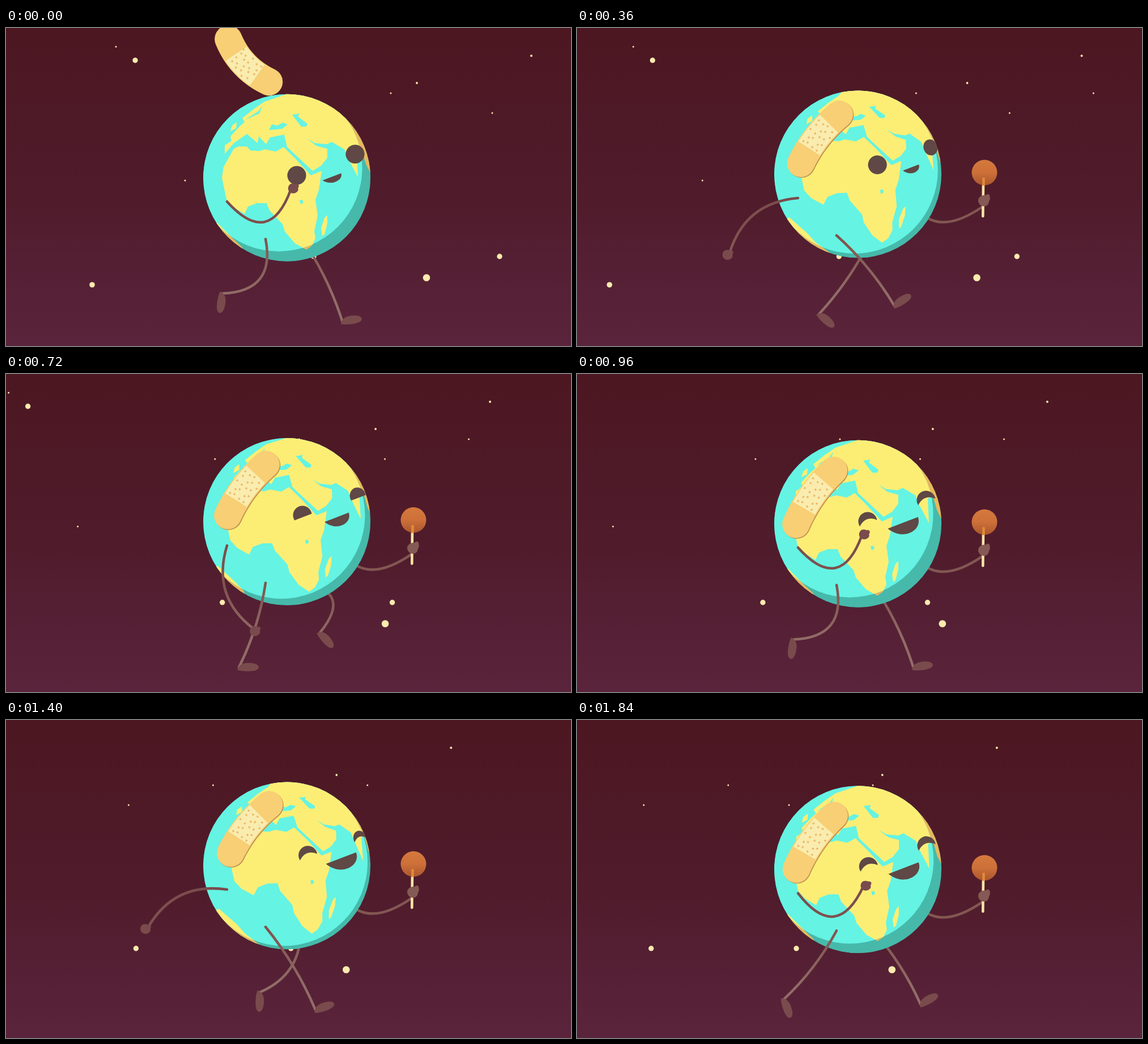
These frames come from a looping animation (997x561 px, 1880 ms). An HTML page:

```html
<!DOCTYPE html>
<html lang="en">
<head>
<meta charset="utf-8">
<title>Walking globe</title>
<style>
html, body { margin: 0; width: 100%; height: 100%; overflow: hidden; background: #4f1a28; }
svg { display: block; width: 100vw; height: 100vh; }
.limb { fill: none; stroke: url(#skin); stroke-width: 4.5; stroke-linecap: round; }
.skin { fill: url(#skin); }
.dark { fill: #5f4845; }
</style>
</head>
<body>
<svg viewBox="0 0 997 561" preserveAspectRatio="none">
  <defs>
    <linearGradient id="sky" x2="0" y2="1">
      <stop stop-color="#4c1721"/><stop offset=".55" stop-color="#501c2c"/><stop offset="1" stop-color="#5a243c"/>
    </linearGradient>
    <linearGradient id="skin" gradientUnits="userSpaceOnUse" x1="0" y1="290" x2="0" y2="470">
      <stop stop-color="#7a4b4c"/><stop offset=".45" stop-color="#80534f"/><stop offset="1" stop-color="#926d68"/>
    </linearGradient>
    <linearGradient id="candy" x2="0" y2="1">
      <stop stop-color="#d5793d"/><stop offset=".5" stop-color="#cd7039"/><stop offset="1" stop-color="#ab572d"/>
    </linearGradient>
    <radialGradient id="glow">
      <stop stop-color="#fff3b0"/><stop offset=".2" stop-color="#ffd98a"/><stop offset=".45" stop-color="#ef9450"/>
      <stop offset=".5" stop-color="#d98358" stop-opacity=".55"/><stop offset="1" stop-color="#b9645a" stop-opacity=".12"/>
    </radialGradient>
    <clipPath id="disc"><circle class="ball" r="147.5"/></clipPath>
    <clipPath id="lit"><circle id="light" r="147.5"/></clipPath>
  </defs>
  <rect width="997" height="561" fill="url(#sky)"/>
  <g id="stars" fill="#fbebaf"></g>
  <path id="farLeg" class="limb"/>
  <path id="farFoot" class="skin foot"/>
  <g id="treat">
    <path class="limb" style="stroke:#835752" d="M618 77Q655 99 716 57"/>
    <path d="M717 12L716.3 74" stroke="#fae6a6" stroke-width="4.6" stroke-linecap="round"/>
    <circle cx="719" cy="-3" r="22.5" fill="url(#candy)"/>
    <path d="M717.5 6V20" stroke="#e28a3c" stroke-width="4.5"/>
    <path fill="#855954" d="M708 48C707 39 717 36 721 37Q726 33 728 37Q730 43 727 48C726 59 711 60 708 48Z"/>
    <g id="spark">
      <circle r="48" fill="url(#glow)"/>
      <path id="rays" fill="#f3a36a" fill-opacity=".85"/>
      <path id="burst" fill="#fff0a8"/>
    </g>
  </g>
  <g clip-path="url(#disc)">
    <circle class="ball" r="148" fill="#46b9aa"/>
    <path class="land" fill="#e8b75b"/>
    <path class="sea" fill="#46b9aa"/>
    <g clip-path="url(#lit)">
      <circle class="ball" r="148" fill="#65f3e3"/>
      <path class="land" fill="#fcee75"/>
      <path class="sea" fill="#65f3e3"/>
    </g>
    <path id="eyeA" class="dark"/>
    <path id="eyeB" class="dark"/>
    <path id="mouth" class="dark"/>
  </g>
  <g fill="none">
    <path id="plasterShade" stroke="#c08f52" stroke-width="48.5" stroke-linecap="round" transform="translate(1.3 1.3)"/>
    <path id="plaster" stroke="#f8cf74" stroke-width="48.5" stroke-linecap="round"/>
    <path id="pad" stroke="#f9ecae" stroke-width="45"/>
    <path id="dots" stroke="#eeb766" stroke-width="1.6"/>
  </g>
  <path id="nearLeg" class="limb"/>
  <path id="nearFoot" class="skin foot"/>
  <path id="arm" class="limb"/>
  <path id="hand" class="skin"/>
</svg>
<script>
const LOOP = 1880, STEP = 40, CYCLE = 960;
const CX = 495.6, BASE_Y = 264.2, R = 147.5;
const { sin, cos, sqrt, hypot, min, max, abs, PI } = Math;
const $ = id => document.getElementById(id);
const all = name => document.querySelectorAll('.' + name);
const set = (el, attrs) => { for (const k in attrs) el.setAttribute(k, attrs[k]); };
const mix = (a, b, k) => a + (b - a) * k;
const ramp = (t, a, b) => {
  const k = min(1, max(0, (t - a) / (b - a)));
  return k * k * (3 - 2 * k);
};
const turn = t => t / CYCLE * 2 * PI;
const points = text => text.split(' ').map(p => p.split(',').map(Number));
const outline = pts => 'M' + pts.map(p => p[0].toFixed(1) + ' ' + p[1].toFixed(1)).join('L') + 'Z';
const place = ([x, y], angle, sx = 1, sy = 1) => `translate(${x} ${y}) rotate(${angle}) scale(${sx} ${sy})`;

// Star layers: speed in px per ms, then x,y,radius
const stars = [
  [.1012, '742,440.5,6.3 725,97,1.9 927,49,2'],
  [.224, '543,403,4.7 679,115,1.5 530,150,1.5'],
  [.263, '228,57,4.7 194,33,1.5 152,453,4.8 871,403,4.7 858,150,1.5 316,269,1.5 1006,115,1.5']
].flatMap(([speed, list]) => points(list).map(([x, cy, r]) => {
  const el = document.createElementNS('http://www.w3.org/2000/svg', 'circle');
  set(el, { cy, r });
  $('stars').append(el);
  return { el, x, speed };
}));

// Simplified coastlines on the untilted globe; points outside the rim lie on the back.
const africa = '402,213 410,209 425,209 431,216 447,217 457,214 476,218 490,210 512,232 538,260 557,252 552,286 ' +
  '546,303 550,331 544,358 546,371 540,384 530,391 510,380 492,359 488,346 465,322 460,309 443,309 427,315 ' +
  '421,328 401,316 389,302 381,264 384,245';
const eurasia = '386,222 386,207 398,199 396,191 413,173 421,166 417,159 437,143 456,130 494,117 505,100 570,105 ' +
  '630,150 665,210 668,280 641,298 635,240 628,215 619,220 621,263 604,231 597,214 575,201 566,205 545,203 ' +
  '531,195 548,208 567,213 567,229 556,243 541,252 496,210 491,188 466,193 459,205 446,191 444,203 425,187 402,203';
const islands = [
  '558,367 556,353 562,335 567,330 567,345 562,364',
  '372,343 401,372 417,387 447,404 430,420 380,390 345,350',
  '396,182 399,172 407,166 406,177'
];
const land = [africa, eurasia, ...islands].map(points);
const seas = [
  '464,180 469,170 479,172 488,167 497,170 487,178',
  '505,153 518,151 515,156 532,169 530,174 521,174',
  '422,162 445,147 453,137 447,151', '518,304 523,303 525,308 520,311'
].map(points);

// Rolls a point of the sphere up and to the right.
function roll([px, py], tilt, cy) {
  let x = px - CX, y = py - BASE_Y, side = 1;
  const r = hypot(x, y);
  if (r > R) { side = -1; x *= (2 * R - r) / r; y *= (2 * R - r) / r; }
  const z = side * sqrt(max(0, R * R - x * x - y * y));
  const dx = .81, dy = -.586, angle = tilt * .165;
  const s = x * dx + y * dy;
  const move = s * cos(angle) + z * sin(angle) - s;
  const depth = z * cos(angle) - s * sin(angle);
  x += move * dx;
  y += move * dy;
  if (depth < 0) {
    const out = 1.2 * R / hypot(x, y);
    x *= out; y *= out;
  }
  return [CX + x, cy + y];
}

// A limb of fixed length: the closer its ends, the more it bends.
function limb(el, [x, y], [ex, ey], length, side) {
  const dx = ex - x, dy = ey - y, d = hypot(dx, dy);
  const bend = side * sqrt(max(150, 1.5 * d * (length - d))) / d;
  set(el, { d: `M${x} ${y}Q${(x + ex) / 2 + dy * bend} ${(y + ey) / 2 - dx * bend} ${ex} ${ey}` });
}

// The ankle sways along a squared-off wave; the foot lies flat while it pushes back.
function drawLeg(name, t, hip, length, centre, reach, snap) {
  const a = turn(t + 100);
  const x = centre + reach * cos(a) + snap * (sin(a) - .66 * sin(3 * a));
  const step = (t - 50 + 2 * CYCLE) % CYCLE + 50;
  const lift = sin(PI * min(1, max(0, (step - 290) / 670)));
  const y = 517 - 71 * lift ** 1.5;
  const angle = 98 * ramp(step, 270, 470) - 130 * ramp(step, 640, 830) + 32 * ramp(step, 850, 1010);
  limb($(name + 'Leg'), hip, [x, y], length, 1);
  set($(name + 'Foot'), { transform: place([x, y], angle) });
}

function drawArm(t, cy) {
  const c = cos(turn(t)), swing = 72 - 83 * c * (1.35 - .35 * c * c);
  const reach = 114 + 42 * ramp(swing, -20, 80), a = swing * PI / 180;
  const at = r => [390 + r * cos(a), cy + 42 + r * sin(a)];
  limb($('arm'), [390, cy + 42], at(reach), 168, -1);
  set($('hand'), { transform: place(at(reach + 4), 0) });
}

function drawFace(t, tilt, cy) {
  const r = 16.6, lid = mix(16.4, 3.5, ramp(t, 540, 700)), curve = 15 * ramp(t, 715, 860);
  const w = sqrt(r * r - lid * lid);
  const eye = (el, base, squeeze) => set(el, {
    d: `M${-w} ${lid}A${r} ${r} 0 1 1 ${w} ${lid}Q0 ${lid - curve} ${-w} ${lid}Z`,
    transform: place(roll(base, tilt, cy), -21, 1 - squeeze, 1 - squeeze / 2)
  });
  eye($('eyeA'), [513, 260], 0);
  eye($('eyeB'), [616, 222.5], .3 * tilt);
  const grin = ramp(t, 500, 900), half = mix(17.5 - 2.5 * ramp(t, 0, 360), 28.5, grin), d = mix(10, 20, grin);
  set($('mouth'), {
    d: `M${-half} 0H${half}C${half} ${d * 1.2} ${-half * .35} ${d * 1.6} ${-half} 0Z`,
    transform: place(roll([575, 262.5], tilt, cy), -21)
  });
}

// The plaster tips over its lower end and lands on the globe.
function drawPlaster(t, tilt) {
  const fall = min(1, t / 200) ** 1.6;
  const x = mix(464, 453 + 11 * tilt, fall), y = mix(95, 170 - 20 * tilt, fall);
  const angle = mix(-133.5, -235 + 3.5 * tilt, fall) * PI / 180;
  const length = mix(104, 116 - 7 * tilt, fall), bend = mix(20, -12, fall);
  const c = cos(angle), s = sin(angle);
  const along = (k, off = 0) => {
    const u = k * length, v = 2 * k * (1 - k) * bend + off;
    return [x + u * c + v * s, y + u * s - v * c];
  };
  const line = (a, b) => 'M' + Array.from({ length: 13 }, (_, i) => along(mix(a, b, i / 12)).join(' ')).join('L');
  const strip = line(0, 1);
  set($('plaster'), { d: strip });
  set($('plasterShade'), { d: strip, opacity: fall });
  set($('pad'), { d: line(.22, .73) });
  let marks = '';
  for (let i = 0; i < 20; i++) {
    const row = i >> 2, jitter = sin(i * 78.2);
    const [px, py] = along(.28 + row * .1 + jitter * .02, (i % 4 - 1.5) * 10 + (row % 2 ? 2 : -2) + jitter * 2);
    marks += `M${px - 2} ${py}h4m-2 -2v4`;
  }
  set($('dots'), { d: marks });
}

const spokes = (count, radius, inner, start) => outline(Array.from({ length: count * 2 }, (_, i) => {
  const a = start + i * PI / count, r = i % 2 ? inner : radius(i / 2);
  return [r * cos(a), r * sin(a)];
}));
set($('rays'), { d: spokes(4, () => 68, 5, .49) });
set($('burst'), { d: spokes(12, i => i % 2 ? 15 : 22, 6, .23) });
set($('hand'), { d: 'M-9 0C-9 -8 -2 -11 4 -8Q10 -9 10 -4Q8 -1 9 2C7 10 -8 11 -9 0Z' });
all('foot').forEach(el => set(el, { d: 'M-3 5C0 -7 12 -8 21 -7C39 -6 39 6 23 7C14 8 4 7 -3 5Z' }));

function draw(t) {
  const tilt = .52 * (1 - cos(turn(t))), cy = BASE_Y - 7 * tilt;
  for (const { el, x, speed } of stars) set(el, { cx: x - speed * t });
  all('ball').forEach(el => set(el, { cx: CX, cy }));
  const shade = 1 - .64 * tilt;
  set($('light'), { cx: CX - 14.5 * shade, cy: cy - 17.5 * shade });
  const trace = shapes => shapes.map(s => outline(s.map(p => roll(p, tilt, cy)))).join('');
  const landPath = trace(land), seaPath = trace(seas);
  all('land').forEach(el => set(el, { d: landPath }));
  all('sea').forEach(el => set(el, { d: seaPath }));

  drawLeg('far', t, [520, 368], 143, 522, 90, 42);
  drawLeg('near', t + CYCLE / 2, [458, cy + 108], 150, 460, 98, 20);
  drawArm(t, cy);
  drawFace(t, tilt, cy);
  drawPlaster(t, tilt);

  const reach = ramp(t, 100, 320);
  set($('treat'), {
    transform: `translate(${mix(-190, 0, reach)} ${cy})`,
    visibility: reach > 0 ? 'visible' : 'hidden'
  });
  const flash = max(0, 1 - abs(t - 1640) / 160), size = mix(.4, 1, flash);
  set($('spark'), {
    transform: place([718.5, -3], (t - 1640) * .06, size, size),
    opacity: min(1, flash * 1.4)
  });
}

const start = performance.now();
function tick() {
  const t = (performance.now() - start) % LOOP;
  draw(Math.floor(t / STEP) * STEP);
  requestAnimationFrame(tick);
}
tick();
</script>
</body>
</html>
```
